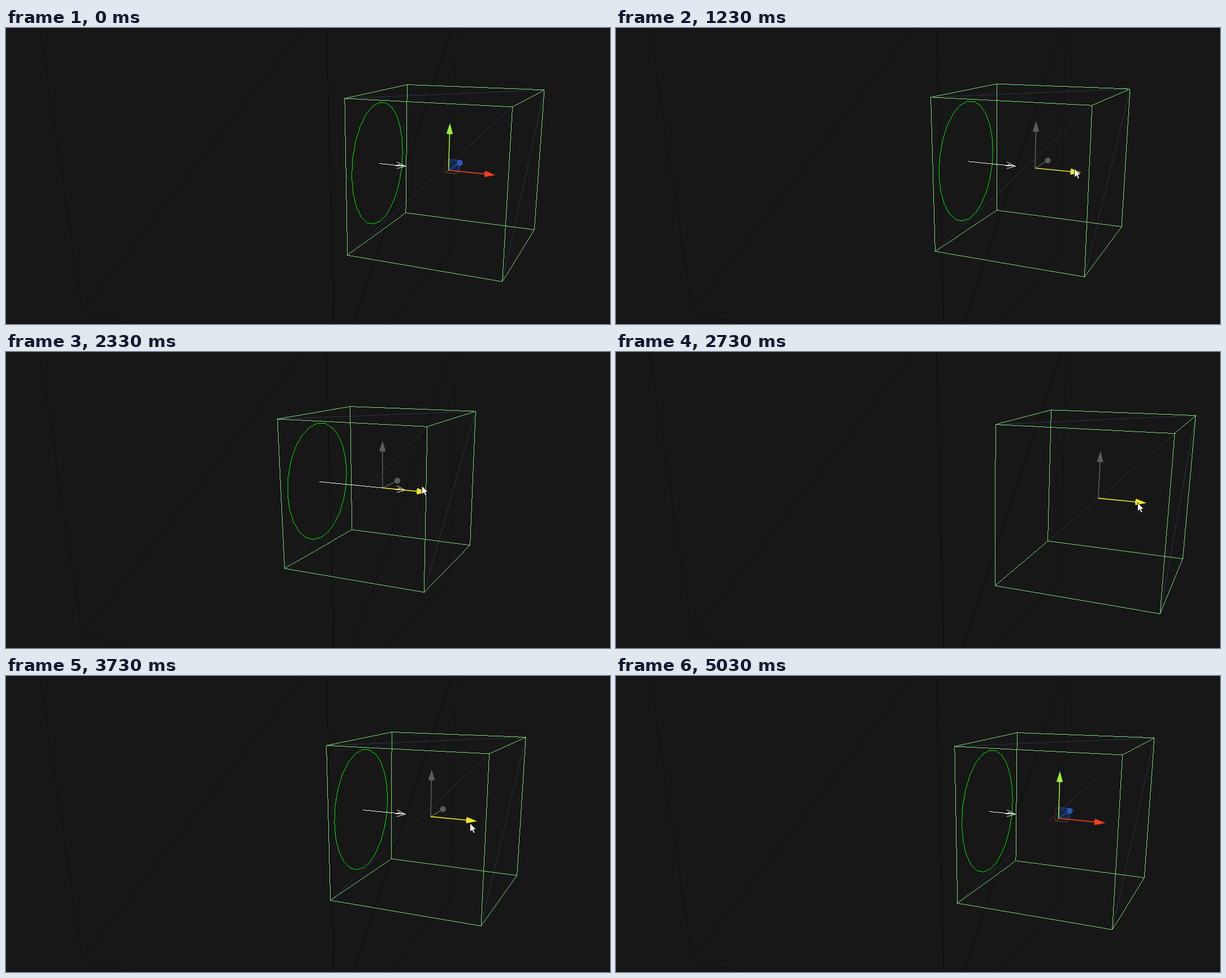
An HTML page with a canvas that plays this animation: 1068 by 525 pixels, repeating every 5910 ms.

```html
<!DOCTYPE html>
<html lang="en">
<head>
<meta charset="utf-8">
<title>Box gizmo drag</title>
<style>
html, body { margin: 0; height: 100%; overflow: hidden; background: #171717; }
canvas { display: block; }
</style>
</head>
<body>
<canvas id="stage" width="1068" height="525"></canvas>
<script>
const ctx = document.getElementById('stage').getContext('2d');
const LOOP = 5910, GRAB = 870, RELEASE = 4600, UNDO = 5030;
const CURSOR_IN = 370, HOVER = 800, CURSOR_OUT = 4850;

// Perspective: screen centre at rest, then vanishing point and depth change per axis.
const CENTER = [782, 252];
const AXES = [
  { vanish: [-1701, 8], rate: -0.0517 },
  { vanish: [668, 4053], rate: 0.03445 },
  { vanish: [1152, 2], rate: 0.1127 }
];
const TARGET_X = -0.611;   // world x where the white arrow ends

// The drag: time and screen x of the gizmo
const DRAG = [
  [GRAB, 782], [1230, 740.8], [1530, 668], [1830, 627.8], [1930, 619], [2130, 619],
  [2730, 852], [3040, 940], [3300, 911], [3370, 871.5], [3900, 698], [4070, 641],
  [4170, 631], [4370, 631], [RELEASE, 689]
];

function ease(t, from, to) {
  const k = Math.min(1, Math.max(0, (t - from) / (to - from)));
  return k * k * (3 - 2 * k);
}

const slope = i => (DRAG[i + 1][1] - DRAG[i][1]) / (DRAG[i + 1][0] - DRAG[i][0]);

function tangent(i) {
  if (i === 0 || i === DRAG.length - 1) return 0;
  const a = slope(i - 1), b = slope(i);
  return a * b > 0 ? 2 * a * b / (a + b) : 0;
}

// Monotone cubic through the drag points; back to rest after the undo
function gizmoX(t) {
  if (t <= GRAB || t >= UNDO) return CENTER[0];
  if (t >= RELEASE) return DRAG[DRAG.length - 1][1];
  const i = DRAG.findIndex(point => point[0] > t) - 1;
  const [t0, x0] = DRAG[i], [t1, x1] = DRAG[i + 1];
  const span = t1 - t0, k = (t - t0) / span, k2 = k * k, k3 = k2 * k;
  return x0 + (x1 - x0) * (3 * k2 - 2 * k3)
    + span * (tangent(i) * (k3 - 2 * k2 + k) + tangent(i + 1) * (k3 - k2));
}

// The hand follows the red arrow and sinks a little on the way back.
function cursorAt(t) {
  const x = gizmoX(t), sink = 10 * ease(t, 2730, 3300);
  const away = 1 - ease(t, CURSOR_IN, HOVER) + ease(t, RELEASE, CURSOR_OUT);
  return [x + 70 + away * 220, 256 + 0.16 * (x - CENTER[0]) + sink + away * 45];
}

function project(x, y, z) {
  const weights = [x, y, z].map((v, i) => v * AXES[i].rate);
  const depth = 1 + weights[0] + weights[1] + weights[2];
  return CENTER.map((c, k) =>
    c + weights.reduce((sum, w, i) => sum + w * (AXES[i].vanish[k] - c), 0) / depth);
}

// Hard-edged one pixel line
function pixelLine([x0, y0], [x1, y1], color) {
  ctx.fillStyle = color;
  const steps = Math.max(1, Math.ceil(Math.max(Math.abs(x1 - x0), Math.abs(y1 - y0))));
  for (let i = 0; i <= steps; i++) {
    const k = i / steps;
    ctx.fillRect(Math.round(x0 + (x1 - x0) * k), Math.round(y0 + (y1 - y0) * k), 1, 1);
  }
}

function polygon(points, fill, stroke) {
  ctx.beginPath();
  points.forEach(p => ctx.lineTo(p[0], p[1]));
  ctx.closePath();
  if (fill) { ctx.fillStyle = fill; ctx.fill(); }
  if (stroke) { ctx.strokeStyle = stroke; ctx.lineWidth = 1; ctx.stroke(); }
}

function shaft(from, to, color, width) {
  ctx.beginPath();
  ctx.moveTo(...from);
  ctx.lineTo(...to);
  ctx.strokeStyle = color;
  ctx.lineWidth = width;
  ctx.stroke();
}

// Diagonals of the front, right and top faces of a cube
function drawDiagonals(corner, color, withTop) {
  pixelLine(corner(1, -1, -1), corner(-1, 1, -1), color);
  pixelLine(corner(1, -1, 1), corner(1, 1, -1), color);
  if (withTop) pixelLine(corner(-1, -1, -1), corner(1, -1, 1), color);
}

// Dark cube, of which only the front and right faces show
function drawRoom() {
  const corner = (x, y, z) => project(-1.293 + 1.483 * x, -0.495 + 1.495 * y, -1.983 + 1.527 * z);
  for (const [x, z] of [[-1, -1], [1, -1], [1, 1]])
    pixelLine(corner(x, -1, z), corner(x, 1, z), x === z ? '#0e0e0e' : '#080808');
  pixelLine(corner(-1, 1, -1), corner(1, 1, -1), '#0a0a0a');
  pixelLine(corner(1, 1, -1), corner(1, 1, 1), '#0a0a0a');
  drawDiagonals(corner, '#080808', false);
}

function drawBox(s) {
  const corner = (x, y, z) => project(s + x, y, z), edge = '#7bd67b';
  drawDiagonals(corner, '#2d3348', true);
  for (const a of [-1, 1]) for (const b of [-1, 1]) {
    pixelLine(corner(-1, a, b), corner(1, a, b), edge);
    pixelLine(corner(a, -1, b), corner(a, 1, b), edge);
    pixelLine(corner(a, b, -1), corner(a, b, 1), edge);
  }
}

function drawRay(s) {
  const radius = 0.845, segments = 24, x = s - 1;
  const rim = i => {
    const angle = i / segments * 2 * Math.PI;
    return project(x, radius * Math.cos(angle), radius * Math.sin(angle));
  };
  for (let i = 0; i < segments; i++) pixelLine(rim(i), rim(i + 1), '#00eb00');

  const tip = project(TARGET_X, 0, 0), arm = 0.045;
  pixelLine(project(x, 0, 0), tip, '#f4f4f4');
  for (const [y, z] of [[arm, 0], [-arm, 0], [0, arm], [0, -arm]])
    pixelLine(project(TARGET_X - 0.125, y, z), tip, '#f4f4f4');
}

function drawArrow(from, neck, tip, color) {
  shaft(from, neck, color, 1.6);
  const angle = Math.atan2(tip[1] - neck[1], tip[0] - neck[0]);
  const nx = -Math.sin(angle) * 5.5, ny = Math.cos(angle) * 5.5;
  polygon([[neck[0] + nx, neck[1] + ny], tip, [neck[0] - nx, neck[1] - ny]], color);
  ctx.beginPath();
  ctx.ellipse(neck[0], neck[1], 1.4, 5.5, angle, 0, 2 * Math.PI);
  ctx.fill();
}

function drawGizmo(s, showZ, dragging, hover) {
  const scale = 1 + s * AXES[0].rate;
  const at = (x, y, z) => project(s + x * scale, y * scale, z * scale);
  const origin = at(0, 0, 0), length = 0.6256, neck = 0.492, side = 0.146;
  const tint = color => dragging ? '#5c5c5c' : color;
  ctx.save();
  ctx.translate(0.5, 0.5);
  if (!dragging) {
    polygon([origin, at(0, -side, 0), at(0, -side, -side), at(0, 0, -side)], null, '#5e2018');
    polygon([origin, at(side, 0, 0), at(side, 0, -side), at(0, 0, -side)], null, '#566024');
    polygon([origin, at(side, 0, 0), at(side, -side, 0), at(0, -side, 0)],
      'rgba(30,60,150,0.4)', '#2a55b8');
  }
  if (showZ) {
    const ball = at(0, 0, 0.507);
    shaft(origin, ball, tint('#2a55b8'), 1.5);
    ctx.beginPath();
    ctx.arc(ball[0], ball[1], 5.2, 0, 2 * Math.PI);
    ctx.fillStyle = tint('#2c56b8');
    ctx.fill();
  }
  drawArrow(origin, at(0, -neck, 0), at(0, -length, 0), tint('#9bf03c'));
  drawArrow(origin, at(neck, 0, 0), at(length, 0, 0), hover ? '#ece52c' : '#f43e22');
  ctx.restore();
}

function drawCursor(x, y) {
  ctx.save();
  ctx.translate(x, y);
  polygon([[0, 0], [0, 15.5], [3.6, 12.3], [6.2, 18], [8.8, 16.8], [6.2, 11.4], [11, 11.2]],
    '#ffffff', '#101010');
  ctx.restore();
}

function draw(t) {
  ctx.fillStyle = '#171717';
  ctx.fillRect(0, 0, 1068, 525);
  drawRoom();

  // World x of the box from the screen x of its centre
  const x = gizmoX(t);
  const s = (CENTER[0] - x) / (x - AXES[0].vanish[0]) / AXES[0].rate;
  const behindTarget = s - 1 < TARGET_X;
  drawBox(s);
  if (behindTarget) drawRay(s);
  drawGizmo(s, behindTarget, t >= GRAB && t < RELEASE, t >= HOVER && t < RELEASE);
  if (t >= CURSOR_IN && t < CURSOR_OUT) drawCursor(...cursorAt(t));
}

const start = performance.now();
function tick() {
  draw((performance.now() - start) % LOOP);
  requestAnimationFrame(tick);
}
tick();
</script>
</body>
</html>
```
